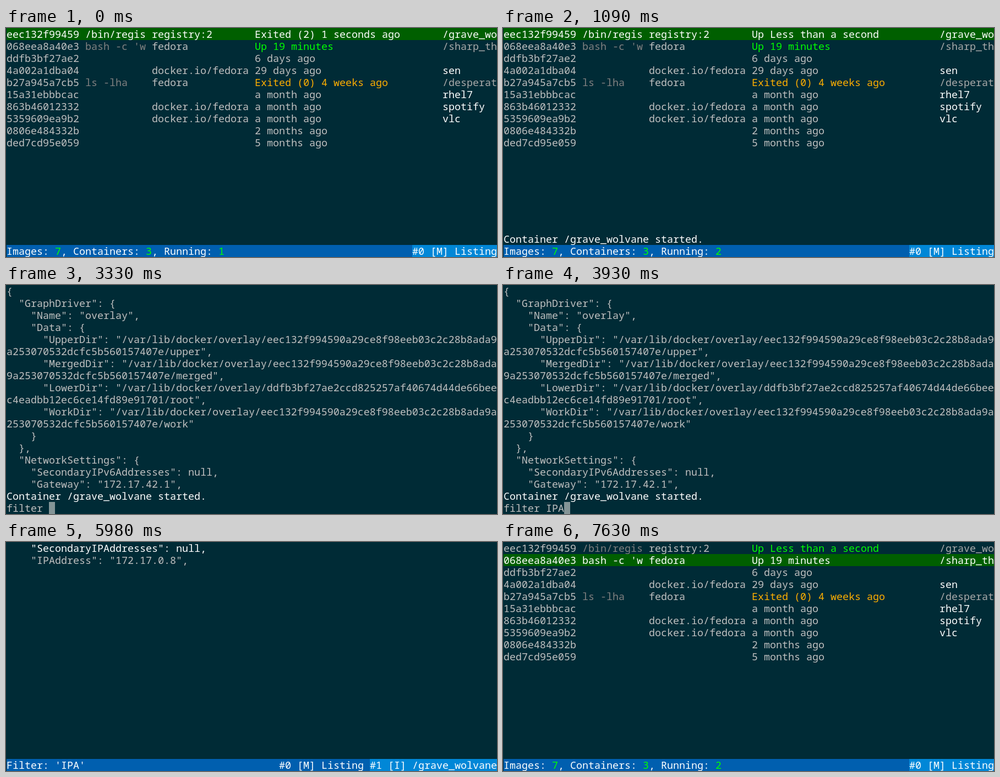
An HTML page that plays this animation: 892 by 418 pixels, repeating every 8 s.

```html
<!DOCTYPE html>
<html lang="en">
<head>
<meta charset="utf-8">
<title>Container terminal</title>
<style>
html, body { margin: 0; width: 100%; height: 100%; overflow: hidden; background: #002b36; }
#term {
  position: absolute; left: 1px; top: 0; width: 891px; height: 418px; overflow: hidden;
  font: 18.3333px/22px "Noto Sans Mono", "DejaVu Sans Mono", monospace;
  font-variant-ligatures: none; white-space: pre; color: #c0c0c0;
}
#term * { animation: 8s step-end infinite; }
.layer, .bar, .pick { position: absolute; left: 0; width: 891px; }
.layer { top: 0; height: 418px; }
pre { margin: 0; font: inherit; }

/* container list */
.row { position: relative; height: 22px; }
.row span { position: absolute; left: 0; --c: #c0c0c0; color: var(--c); }
.row .cmd { left: 143px; --c: #808080; }
.row .img { left: 264px; }
.row .st { left: 451px; }
.row .name { left: 792px; --c: #aaa; }
.row .tag { left: 792px; --c: #fff; }
.row .up { --c: #0f0; }
.row .exit { --c: #ffaf00; }
.pick { height: 22px; background: #005f00; }
#term .pick { animation-name: pick; }
#term .first span { animation-name: unlit; }
#term .second span { animation-name: lit; }
#term .first .before { animation-name: unlit, before; animation-duration: 8s; }
#term .first .after { animation-name: unlit, after; animation-duration: 8s; }

/* bottom lines */
.bar { top: 396px; height: 22px; background: #005faf; color: #fff; }
.bar b { font-weight: inherit; color: #0f0; }
.tabs { position: absolute; right: 0; top: 0; }
.on { display: inline-block; height: 22px; vertical-align: top; background: #0087d7; }
.num { position: absolute; left: 385px; }
#term .one { animation-name: one; }
#term .two { animation-name: two; }
#msg { position: absolute; top: 374px; color: #fff; }
#prompt { position: absolute; top: 396px; }
#prompt i { position: absolute; font-style: normal; left: 77px; top: 0; height: 22px; overflow: hidden; }
#prompt .cursor { width: 11px; background: #839496; }
#term .typed { animation-name: type; }
#term .cursor { animation-name: cursor; }
#term .head { animation-name: head; }

#term #list { animation-name: list; }
#term #json { animation-name: json; }
#term #found { animation-name: found; }
#term #inspect { animation-name: inspect; }
#term #prompt { animation-name: prompt; }
#term #msg { animation-name: msg; }

@keyframes list { 0% { opacity: 1 } 30.875% { opacity: 0 } 78.625%, to { opacity: 1 } }
@keyframes json { 0% { opacity: 0 } 30.875% { opacity: 1 } 54.25%, to { opacity: 0 } }
@keyframes found { 0% { opacity: 0 } 54.25% { opacity: 1 } 78.625%, to { opacity: 0 } }
@keyframes inspect { 0% { opacity: 0 } 30.875% { opacity: 1 } 41.625% { opacity: 0 } 54.25% { opacity: 1 } 78.625%, to { opacity: 0 } }
@keyframes prompt { 0% { opacity: 0 } 41.625% { opacity: 1 } 54.25%, to { opacity: 0 } }
@keyframes msg { 0% { opacity: 0 } 10.875% { opacity: 1 } 74.75%, to { opacity: 0 } }
@keyframes before { 0% { opacity: 1 } 12.25%, to { opacity: 0 } }
@keyframes after { 0% { opacity: 0 } 12.25%, to { opacity: 1 } }
@keyframes one { 0% { opacity: 1 } 13.625%, to { opacity: 0 } }
@keyframes two { 0% { opacity: 0 } 13.625%, to { opacity: 1 } }
@keyframes head { 0% { color: #fff } 41.625%, to { color: #c0c0c0 } }
@keyframes type { 0% { width: 0 } 46% { width: 11px } 47.25% { width: 22px } 49.125%, to { width: 33px } }
@keyframes cursor { 0% { left: 77px } 46% { left: 88px } 47.25% { left: 99px } 49.125%, to { left: 110px } }
@keyframes pick { 0% { top: 0 } 95.375%, to { top: 22px } }
@keyframes unlit { 0% { color: #fff } 95.375%, to { color: var(--c) } }
@keyframes lit { 0% { color: var(--c) } 95.375%, to { color: #fff } }
</style>
</head>
<body>
<div id="term"><div class="layer" id="list"><div class="pick"></div
><div class="row first"><span>eec132f99459</span><span class="cmd">/bin/regis</span><span class="img">registry:2</span><span class="st before">Exited (2) 1 seconds ago</span><span class="st up after">Up Less than a second</span><span class="name">/grave_wo</span></div
><div class="row second"><span>068eea8a40e3</span><span class="cmd">bash -c 'w</span><span class="img">fedora</span><span class="st up">Up 19 minutes</span><span class="name">/sharp_th</span></div
><div class="row"><span>ddfb3bf27ae2</span><span class="st">6 days ago</span></div
><div class="row"><span>4a002a1dba04</span><span class="img">docker.io/fedora</span><span class="st">29 days ago</span><span class="tag">sen</span></div
><div class="row"><span>b27a945a7cb5</span><span class="cmd">ls -lha</span><span class="img">fedora</span><span class="st exit">Exited (0) 4 weeks ago</span><span class="name">/desperat</span></div
><div class="row"><span>15a31ebbbcac</span><span class="st">a month ago</span><span class="tag">rhel7</span></div
><div class="row"><span>863b46012332</span><span class="img">docker.io/fedora</span><span class="st">a month ago</span><span class="tag">spotify</span></div
><div class="row"><span>5359609ea9b2</span><span class="img">docker.io/fedora</span><span class="st">a month ago</span><span class="tag">vlc</span></div
><div class="row"><span>0806e484332b</span><span class="st">2 months ago</span></div
><div class="row"><span>ded7cd95e059</span><span class="st">5 months ago</span></div
><div class="bar">Images: <b>7</b>, Containers: <b>3</b>, Running: <b class="num one">1</b><b class="num two">2</b><span class="tabs"><span class="on">#0 [M] Listing</span></span></div
></div><pre class="layer" id="json"><span class="head">{</span>
  "GraphDriver": {
    "Name": "overlay",
    "Data": {
      "UpperDir": "/var/lib/docker/overlay/eec132f994590a29ce8f98eeb03c2c28b8ada9
a253070532dcfc5b560157407e/upper",
      "MergedDir": "/var/lib/docker/overlay/eec132f994590a29ce8f98eeb03c2c28b8ada
9a253070532dcfc5b560157407e/merged",
      "LowerDir": "/var/lib/docker/overlay/ddfb3bf27ae2ccd825257af40674d44de66bee
c4eadbb12ec6ce14fd89e91701/root",
      "WorkDir": "/var/lib/docker/overlay/eec132f994590a29ce8f98eeb03c2c28b8ada9a
253070532dcfc5b560157407e/work"
    }
  },
  "NetworkSettings": {
    "SecondaryIPv6Addresses": null,
    "Gateway": "172.17.42.1",</pre
><div class="bar" id="inspect"><span class="tabs">#0 [M] Listing <span class="on">#1 [I] /grave_wolvane</span></span></div
><div class="layer" id="found"><pre><span style="color:#fff">    "SecondaryIPAddresses": null,</span>
    "IPAddress": "172.17.0.8",</pre><div class="bar" style="background:none">Filter: 'IPA'</div></div
><div id="prompt">filter <i class="typed">IPA</i><i class="cursor"></i></div
><div id="msg">Container /grave_wolvane started.</div></div>
</body>
</html>
```
